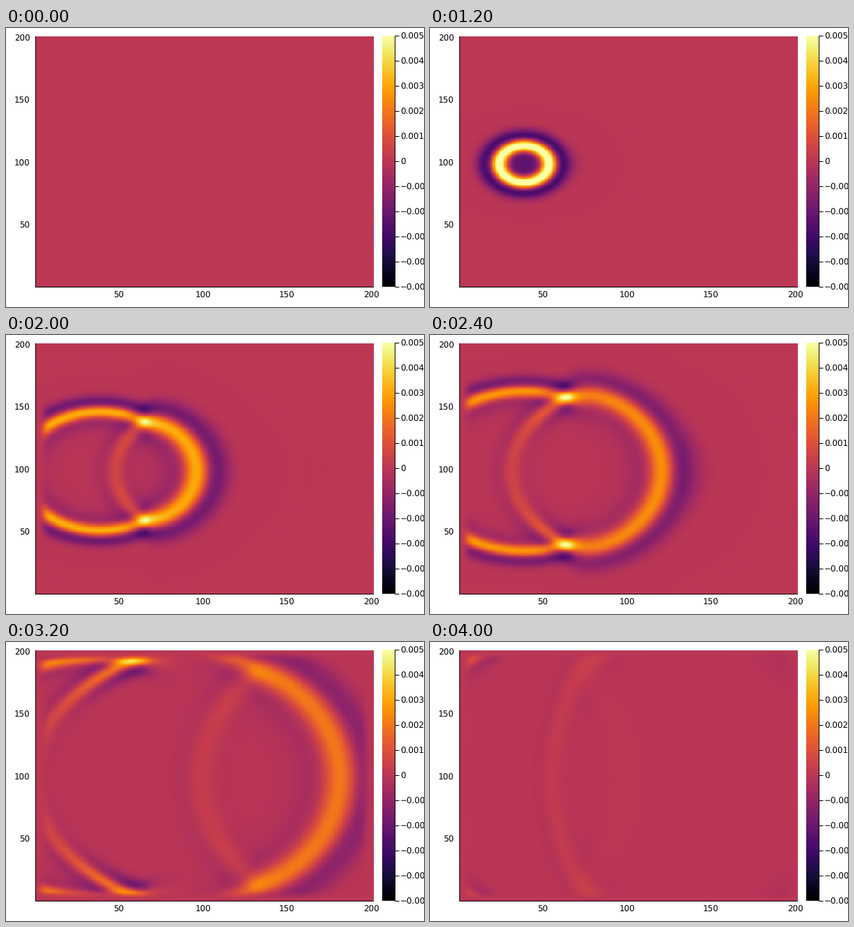
A matplotlib script that plays this animation: 600 by 400 pixels, repeating every 4200 ms.

```python
import numpy as np
import matplotlib.pyplot as plt
from matplotlib.animation import FuncAnimation

plt.rcParams["text.hinting"] = "none"

FRAMES, INTERVAL = 21, 200
N = 201                         # grid cells per side
SRC = (98, 38)                  # row, column of the point source
SPEEDS = (8.16, 12.24, 16.32)   # cells per frame in the three vertical layers
FREQ = 0.385                    # Ricker peak frequency, cycles per frame
DELAY = 1.5 / FREQ
STEPS = 40                      # time steps per frame
PML, DAMP = 10, 16.6            # absorbing border: width and strength
CLIM = 0.005


def damping(pos):
    depth = np.maximum(np.maximum(PML - pos, pos - (N - 1 - PML)), 0) / PML
    return DAMP * depth ** 2


def factors(sigma, dt):
    half = sigma * dt / 2
    return (1 - half) / (1 + half), dt / (1 + half)


def slope(a, pad):
    """Fourth-order staggered derivative along the rows, zero outside."""
    d = np.diff(np.pad(a, ((0, 0), (pad, pad))), axis=1)
    return (26 * d[:, 1:-1] - d[:, :-2] - d[:, 2:]) / 24


def simulate():
    """Split-field acoustic wave in a layered medium, one snapshot per frame."""
    dt = 1 / STEPS
    cells, faces = np.arange(N), np.arange(N + 1) - 0.5
    keep_c, step_c = factors(damping(cells), dt)
    keep_f, step_f = factors(damping(faces), dt)
    col = lambda a: a[:, None]
    v2 = np.repeat(SPEEDS, N // 3)[None, :] ** 2
    gain_x, gain_y = v2 * step_c, v2 * col(step_c)

    px, py = np.zeros((N, N)), np.zeros((N, N))
    ux, uy = np.zeros((N, N + 1)), np.zeros((N + 1, N))
    shots = [px + py]
    for n in range((FRAMES - 1) * STEPS):
        p = px + py
        ux = keep_f * ux + step_f * slope(p, 2)
        uy = col(keep_f) * uy + col(step_f) * slope(p.T, 2).T
        px = keep_c * px + gain_x * slope(ux, 1)
        py = col(keep_c) * py + gain_y * slope(uy.T, 1).T
        # time integral of a Ricker wavelet
        t = (n + 0.5) * dt - DELAY
        px[SRC] += dt * t * np.exp(-(np.pi * FREQ * t) ** 2)
        if (n + 1) % STEPS == 0:
            shots.append(px + py)
    wave = np.array(shots)
    return wave * 0.0039 / wave[8, :, SRC[1]].max()


wave = simulate()

fig = plt.figure(figsize=(6, 4), dpi=100, facecolor="white")
ax = fig.add_axes([0, 0, 1, 1])
ax.axis("off")

L, R, T, B = 42, 528, 12, 371
heat = ax.imshow(wave[0], cmap="inferno", vmin=-CLIM, vmax=CLIM, origin="lower",
                 extent=(L, R, B, T), aspect="auto", interpolation="nearest")
ax.imshow(np.linspace(0, 1, 256)[:, None], cmap="inferno", origin="lower",
          extent=(540, 558, 371, 11), aspect="auto", interpolation="nearest")
ax.set_xlim(0, 600)
ax.set_ylim(400, 0)


def line(x0, y0, x1, y1):
    ax.plot([x0, x1], [y0, y1], color="black", lw=0.72,
            solid_capstyle="butt", snap=False)


def label(x, y, text, ha):
    ax.text(x, y + 4.3, text, ha=ha, va="baseline", fontsize=8.6,
            family="DejaVu Sans", color="black")


line(42.5, 12, 42.5, 372)
line(42, 371.5, 528, 371.5)
for v in (50, 100, 150, 200):
    frac = (v - 0.5) / N
    label(L + frac * (R - L), 383, str(v), "center")
    label(34.6, B - frac * (B - T), str(v), "right")

line(558.5, 11, 558.5, 372)
for k in range(-5, 6):
    y = 191.5 - k * 36
    line(558, y, 564.5, y)
    text = f"{k / 1000:.3f}".replace("-", "\u2212") if k else "0"
    label(566, y, text, "left")


def update(i):
    heat.set_data(wave[i])
    return [heat]


anim = FuncAnimation(fig, update, frames=FRAMES, interval=INTERVAL,
                     repeat=True, repeat_delay=0, blit=False)
plt.show()
```
